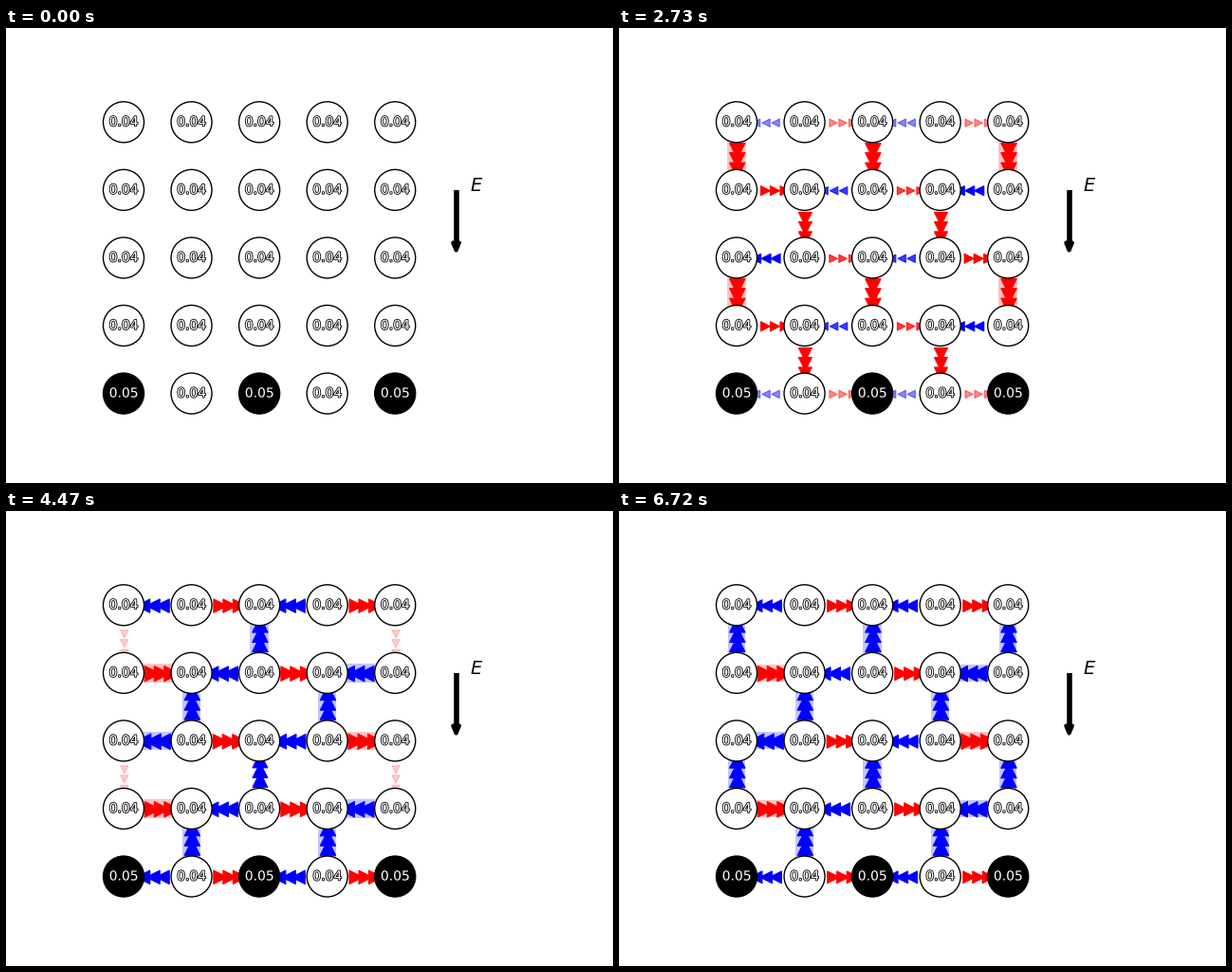
A matplotlib script for the animation above (6.75 s loop, 640 by 480 pixels).

```python
import numpy as np
import matplotlib.pyplot as plt
from matplotlib.animation import FuncAnimation
from matplotlib.collections import PolyCollection
from matplotlib.patches import Circle, Polygon, Rectangle
from matplotlib.patheffects import withStroke

FRAMES, STEP_MS = 225, 30
N, GAP, RADIUS = 5, 71.56, 21.5
X0, Y0 = 124, 99.3
NUDGE = 0.8  # arrows sit slightly right of and below the grid lines
FLIP = 3.42  # seconds until the flow turns
RED, BLUE, GREY = (1, 0, 0), (0, 0, 1), (0.51, 0.51, 0.51)

# Strength before and after the flip: up to 1 it sets opacity,
# up to 2 the head size, beyond that the halo.
LEVELS = {
    "v_side": (2.5, -2.1),
    "v_centre": (2.0, -2.4),
    "v_mid": (1.7, -2.4),
    "h_side": (1.2, 2.45),
    "h_mid": (0.77, 1.9),
    "h_rim": (0.47, 1.75),
}
FLIP_TIME = {"v_side": 2.1, "v_centre": 1.06, "v_mid": 0.87}


def ease(x):
    x = np.clip(x, 0, 1)
    return x * x * (3 - 2 * x)


def strength(kind, row, t):
    before, after = LEVELS[kind]
    if kind[0] == "v":
        rise = min(t / 0.3, 1)
        span = FLIP_TIME[kind] + 0.13 * row * (kind == "v_centre")
        fade = 1
    else:
        rise = ease(t / 1.5)
        span = 0.6
        fade = 1 - 0.12 * ease((t - 4.2) / 2.5)
    start = before * rise
    return (start + (after - start) * ease((t - FLIP) / span)) * fade


def node(col, row):
    return np.array([X0 + col * GAP, Y0 + row * GAP])


def build_links():
    links = []
    for row in range(N):
        for col in range(N - 1):
            if row in (0, N - 1):
                kind = "h_rim"
            else:
                kind = "h_side" if col in (0, N - 2) else "h_mid"
            ends = node(col, row), node(col + 1, row)
            right = (row + col) % 2 == 1
            links.append((*(ends if right else ends[::-1]), kind, row,
                          RED if right else BLUE))
    for row in range(N - 1):
        for col in range(row % 2, N, 2):
            kind = ("v_centre", "v_mid", "v_side")[abs(col - N // 2)]
            links.append((node(col, row), node(col, row + 1), kind, row, None))
    return links


def band(start, end, half):
    u = (end - start) / GAP
    n = np.array([-u[1], u[0]]) * half
    return [start + n, end + n, end - n, start - n]


def head(start, u, offset, half):
    n = np.array([-u[1], u[0]]) * half
    mid = start + u * offset + NUDGE * np.abs(u[::-1])
    return [mid - u * half + n, mid + u * half, mid - u * half - n]


fig = plt.figure(figsize=(6.4, 4.8), dpi=100, facecolor="white")
ax = fig.add_axes([0, 0, 1, 1])
ax.set(xlim=(0, 640), ylim=(480, 0))
ax.axis("off")

halos = PolyCollection([], linewidths=0, zorder=1)
heads = PolyCollection([], linewidths=0.8, zorder=2)
ax.add_collection(halos, autolim=False)
ax.add_collection(heads, autolim=False)

outline = [withStroke(linewidth=1.2, foreground="black")]
for row in range(N):
    for col in range(N):
        x, y = node(col, row)
        full = row == N - 1 and col % 2 == 0
        ax.add_patch(Circle((x, y), RADIUS, fc="black" if full else "white",
                            ec="black", lw=1, zorder=3))
        ax.text(x, y, "0.05" if full else "0.04", color="white", fontsize=10,
                ha="center", va="center", path_effects=outline, zorder=4)

shades = [ax.add_patch(Rectangle((x, 118), 32, 247, fc="black", ec="none",
                                 alpha=0.345, zorder=5))
          for x in (113, 389)]

ax.plot([474.6, 474.6], [171, 228], color="black", lw=4,
        solid_capstyle="butt")
ax.add_patch(Polygon([(471.3, 226.5), (477.9, 226.5), (474.6, 234.5)],
                     color="black", lw=3, joinstyle="round"))
ax.text(496, 166.3, "E", fontsize=14, style="italic", ha="center", va="center")

LINKS = build_links()


def update(i):
    t = i * STEP_MS / 1000
    shaded = 0.36 <= t <= 0.48
    for shade in shades:
        shade.set_visible(shaded)

    bands, band_colors, tris, tri_colors = [], [], [], []
    for start, end, kind, row, color in LINKS:
        s = strength(kind, row, t)
        size = abs(s)
        if size < 0.01:
            continue
        if s < 0:
            start, end = end, start
        if color is None:
            color = RED if s > 0 else BLUE
        if shaded and kind == "v_side":
            color = GREY
        if size > 2:
            bands.append(band(start, end, 8.5 + min(size - 2, 0.5) * 3.2))
            band_colors.append((*color, 0.23))
        half = 4.2 + 4 * np.clip(size - 1, 0, 1)
        u = (end - start) / GAP
        for offset in (30.5, 40.5, 51):
            tris.append(head(start, u, offset, half))
            tri_colors.append((*color, min(size, 1)))

    halos.set_verts(bands)
    halos.set_facecolor(band_colors)
    heads.set_verts(tris)
    heads.set_facecolor(tri_colors)
    heads.set_edgecolor(tri_colors)
    return [halos, heads, *shades]


anim = FuncAnimation(fig, update, frames=FRAMES, interval=STEP_MS,
                     repeat=True, repeat_delay=0, blit=False)
plt.show()
```
